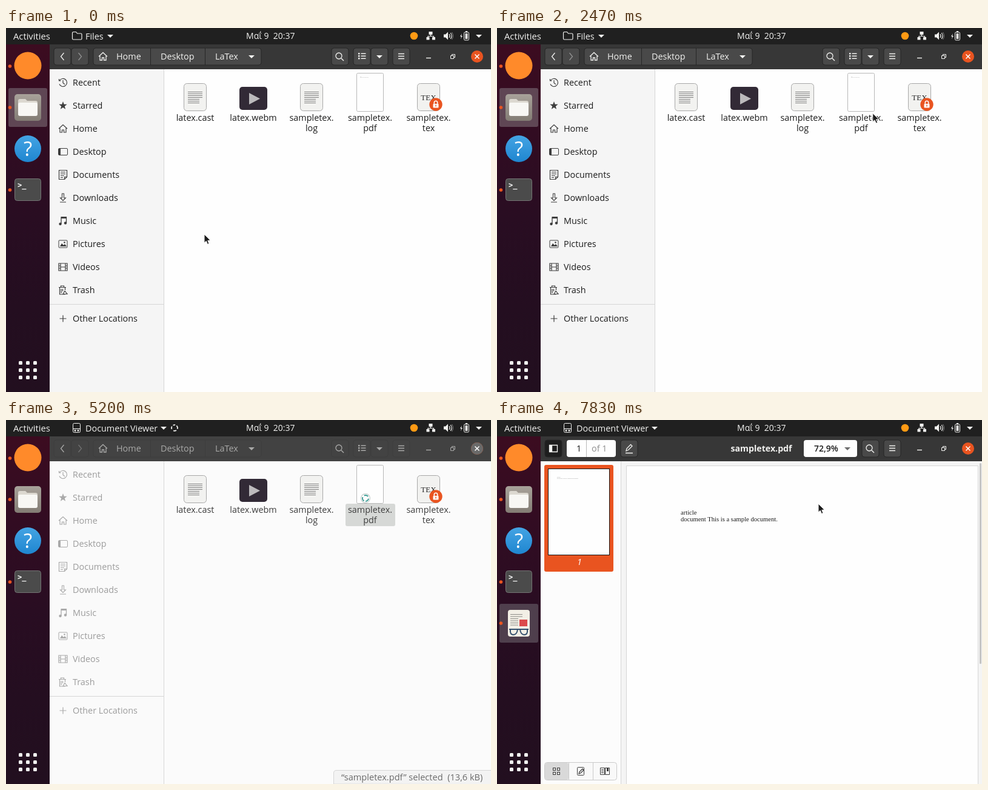
An HTML page that plays this animation: 800x600 px, repeating every 8 s.

```html
<!DOCTYPE html>
<html lang="en">
<head>
<meta charset="utf-8">
<title>Opening a document</title>
<style>
html, body { margin: 0; width: 100%; height: 100%; overflow: hidden; background: #fefefe; }
svg { display: block; width: 800px; height: 600px; font: 14.4px "Open Sans", "Noto Sans", sans-serif; }
text { white-space: pre; }
</style>
</head>
<body>
<svg id="stage" viewBox="0 0 800 600" xmlns="http://www.w3.org/2000/svg"></svg>
<script>
const LOOP = 8000;
const INK = '#1c1c1c', PALE = '#f2f2f0', ORANGE = '#e95420', WHITE = '#fefefe';
const HEAD = '#373737', EDGE = '#262626', SIDE = '#3d3d3d', RULE = '#d6d6d6', PAPER = '#f2f2f0';

// ---- drawing helpers ----
const rect = (x, y, w, h, fill, more = '') =>
  `<rect x="${x}" y="${y}" width="${w}" height="${h}" fill="${fill}" ${more}/>`;
const box = (x, y, w, h, fill, r = 4, stroke = 'none', more = '') =>
  rect(x, y, w, h, fill, `rx="${r}" stroke="${stroke}" ${more}`);
const dot = (x, y, r, fill, more = '') => `<circle cx="${x}" cy="${y}" r="${r}" fill="${fill}" ${more}/>`;
const text = (x, y, s, fill = INK, more = '') => `<text x="${x}" y="${y}" fill="${fill}" ${more}>${s}</text>`;
const mid = 'text-anchor="middle"';
const line = (d, stroke = INK, w = 1) => `<path d="${d}" fill="none" stroke="${stroke}" stroke-width="${w}"/>`;
const shape = (d, fill, more = '') => `<path d="${d}" fill="${fill}" ${more}/>`;
const group = (s, more = '') => `<g ${more}>${s}</g>`;
const at = (x, y, s) => group(s, `transform="translate(${x} ${y})"`);
const caret = (x, y, fill = PALE) => shape(`M${x - 5} ${y - 2.5}h10l-5 5z`, fill);
const times = (n, fn) => Array.from({ length: n }, (_, i) => fn(i)).join('');

// ---- top bar ----
function topBar() {
  const files = line('M109.5 8.5q0-2 2-2h4l2 2.5h6q1.5 0 1.5 1.5v7q0 1.5-1.5 1.5h-12.5q-1.5 0-1.5-1.5z', PALE, 1.2)
    + text(131, 19, 'Files', PALE) + caret(172, 13.5);
  const viewer = box(110.5, 5.5, 12, 15, 'none', 2, PALE) + line('M111 14.5h11', PALE, 1.2)
    + dot(114, 17.5, 1.5, PALE) + dot(119, 17.5, 1.5, PALE)
    + text(131, 19, 'Document Viewer', PALE) + caret(260, 13.5);
  const net = rect(697.5, 6, 6, 5, PALE) + rect(693.5, 15, 5, 4.5, PALE) + rect(703, 15, 5, 4.5, PALE)
    + line('M700.5 11v2.5M696 15v-1.5h9.5v1.5', PALE, 1.2);
  const sound = shape('M722 10.5h3l4-4v13l-4-4h-3z', PALE)
    + line('M731 10q2 3 0 6M733.3 8q3.5 5 0 10', PALE, 1.2) + line('M735.6 7q3.6 6 0 12', '#858585');
  const battery = box(755.5, 7, 8, 13, 'none', 1.5, PALE) + rect(758, 5, 3, 2, PALE)
    + rect(757.5, 9, 4, 9, PALE) + shape('M752 9l-3 5h2l-1 4 3-5h-2z', PALE);
  const arcs = 'M-4.8 -1a5 5 0 0 1 4-4M2 -4.6a5 5 0 0 1 2.8 4M4 3a5 5 0 0 1-4 2M-2.5 4.3a5 5 0 0 1-2.2-3';
  return rect(0, 0, 800, 27, '#202020') + text(12, 19, 'Activities', PALE, 'font-size="14.8"')
    + group(files, 'id="appFiles"') + group(viewer, 'id="appViewer"')
    + group(line(arcs, PALE, 1.7), 'id="spin"')
    + text(396, 18, 'Μαΐ 9\u00a0 20:37', PALE, 'font-size="14"')
    + dot(673, 13, 6.3, '#ff9a14') + net + sound + battery + caret(780, 13.5);
}

// ---- dock ----
const running = y => dot(6.5, y, 2.8, ORANGE);
function dock() {
  const paper = box(18, 313, 36, 44, '#f2efe6', 4)
    + times(6, i => rect(22, 320 + i * 3.5, i > 1 ? 13 : 20, 1, '#8c8c88')) + rect(37, 329, 13, 11, '#dc4a4c')
    + line('M20 345h32M22 345q-1 9 5 9 6 0 7-9zM38 345q1 9 7 9 6 0 5-9z', '#34506e', 2);
  return rect(0, 27, 72, 573, 'url(#dockFill)')
    + box(4, 99, 64, 64, '#5f4654', 3, 'none', 'id="hotFiles"')
    + dot(36, 62, 22.5, '#ff8a2a')
    + box(14, 109, 44, 44, 'url(#filesFill)', 5)
    + shape('M20 120q0-3 3-3h9l3 3h14q3 0 3 3v18q0 3-3 3h-26q-3 0-3-3z', '#dcd8d0')
    + box(20, 123, 32, 22, '#f8f7f4', 3)
    + dot(36, 199, 22, 'url(#helpFill)') + text(36, 211, '?', WHITE, mid + ' font-size="33"')
    + box(14.5, 248.5, 43, 36, '#4b4b4b', 4, '#757575')
    + text(19, 263, '&gt;_', WHITE, 'font-family="DejaVu Sans Mono, monospace" font-size="12" font-weight="bold"')
    + running(63) + running(131) + running(267)
    + group(box(4, 303, 64, 64, '#4f3f4d', 3) + paper + running(335), 'id="hotViewer"')
    + times(9, i => box(21 + i % 3 * 12, 549 + Math.floor(i / 3) * 12, 6, 6, PALE, 1.5));
}

// ---- window chrome ----
const button = (x, w = 28, fill = '#494949') => box(x, 33, w, 28, fill, 4, EDGE);
const search = x => dot(x - 1, 46, 5, 'none', `stroke="${PALE}" stroke-width="1.3"`) + line(`M${x + 3} 50l4 4`, PALE, 1.4);
const menu = x => line(`M${x - 5} 42.5h10m-10 4h10m-10 4h10`, PALE, 1.3);
const winKeys = line('M693 49.5h8', PALE, 1.4) + line('M733.5 45.5h5v5h-5zM735.5 45v-1.5h5v5h-1.5', PALE);
const cross = line('M773.5 43.5l7 7m0-7l-7 7', WHITE, 1.5);
const house = 'M-7 0L0 -6.5L7 0M-5 -1v7h3.5v-4h3v4h3.5v-7';

function filesHeader() {
  const plates = button(79) + button(108) + button(144, 277) + button(537) + button(573) + button(602) + button(638)
    + line('M238.5 33v28M328.5 33v28', EDGE);
  const marks = line('M95.5 41l-5 6 5 6', PALE, 1.3) + line('M119.5 41l5 6-5 6', '#929292', 1.3)
    + at(160, 47, line(house, PALE, 1.3)) + text(182, 52, 'Home', PALE) + text(255, 52, 'Desktop', PALE)
    + text(345, 52, 'LaTex', PALE) + caret(405, 47.5) + search(550) + caret(616, 47.5) + menu(652)
    + times(3, i => rect(581, 41 + i * 4, 2.5, 2.5, PALE) + rect(585.5, 41.5 + i * 4, 8, 1.5, PALE)) + winKeys;
  return rect(72, 27, 728, 41, HEAD) + rect(72, 27, 728, 41, '#424242', 'id="headDim"')
    + group(plates, 'id="plates"') + group(marks, 'id="marks"')
    + dot(777, 47, 10, ORANGE) + dot(777, 47, 10, '#6a6a6a', 'id="closeDim"') + cross;
}

// ---- sidebar ----
const star = times(10, i => {
  const r = i % 2 ? 2.9 : 7, a = i * Math.PI / 5;
  return `${i ? 'L' : 'M'}${(r * Math.sin(a)).toFixed(2)} ${(-r * Math.cos(a)).toFixed(2)}`;
}) + 'z';
const places = [
  ['Recent', line('M-5.5 -3.5a6.5 6.5 0 1 1 -.5 6M0 -4v4.5l3 2.5M-6.5 -6v3h3', SIDE, 1.2)],
  ['Starred', shape(star, SIDE)],
  ['Home', line(house, SIDE, 1.2)],
  ['Desktop', box(-7.5, -5.5, 15, 11, 'none', 1.5, SIDE) + rect(-7, -5, 3, 10, SIDE)],
  ['Documents', line('M-6.5 -7.5h13v11l-4 4h-9zM6.5 3.5h-4v4M-4 -4.5h8m-8 3h8m-8 3h6m-6 3h4', SIDE, 1.2)],
  ['Downloads', line('M-1.5 -7h3v7h3l-4.5 4.5l-4.5 -4.5h3zM-5 7h10', SIDE, 1.1)],
  ['Music', line('M-3 5v-11h8.5v9', SIDE, 1.3) + rect(-3, -7, 9, 3, SIDE) + dot(-4.5, 5, 2.2, SIDE) + dot(4, 3.5, 2.2, SIDE)],
  ['Pictures', box(-7, -6, 14, 12, 'none', 1, SIDE) + shape('M-5 4l3-5 3 3 2-2 3 4z', SIDE) + dot(2.5, -2.5, 1.3, SIDE)],
  ['Videos', line('M-7 -6h14v12h-14zM-4 -6v12M4 -6v12M-7 -2h3m-3 4h3M4 -2h3m-3 4h3M-4 0h8', SIDE, 1.2)],
  ['Trash', line('M-7 -4.5h12M-3.5 -4.5v-2.5h5v2.5M-5.5 -4.5v11.5h9M-3 -2v7m2.5-7v4M3.5 -4v4M0 6.5l3-5 4 5z', SIDE, 1.2)],
];
const place = (y, [name, icon]) => at(94, y, icon) + text(110, y + 5, name);
function sidebar() {
  const rows = places.map((p, i) => place(90 + i * 38, p)).join('')
    + place(479, ['Other Locations', line('M-5.5 0h11M0 -5.5v11', SIDE, 1.2)]);
  return rect(72, 68, 188, 532, '#f5f5f5') + rect(72, 68, 188, 532, '#fafafa', 'id="sideDim"')
    + line('M72 455.5h188M260.5 68v532', RULE) + group(rows, 'id="places"');
}

// ---- file grid ----
const sheet = (x, id, inside) => box(x + .5, 91.5, 37, 45, PAPER, 5, '#a8a8a8', `id="${id}"`) + inside;
const ruled = x => times(7, i => rect(x + 7, 105 + i * 3, i > 3 ? 19 : 24, 1, '#7c7c7c'));
const label = (x, a, b = '') => text(x, 153, a, 'currentColor', mid) + text(x, 170, b, 'currentColor', mid);
const tiny = (x, y, size) => text(x, y, 'article', '#858585', `font-size="${size}"`)
  + text(x, y + size * 1.15, 'document This is a sample document.', '#858585', `font-size="${size}"`);
function grid() {
  const lock = dot(709, 126, 10.7, ORANGE) + box(704.5, 125, 9, 6.5, WHITE, 1)
    + line('M706.3 125v-2a2.7 2.7 0 0 1 5.4 0v2', WHITE, 1.6) + rect(708.3, 126.5, 1.4, 3, ORANGE);
  return rect(261, 68, 539, 532, WHITE) + rect(261, 68, 539, 532, '#fbfbfb', 'id="gridDim"')
    + sheet(293, 'cast', ruled(293)) + sheet(485, 'log', ruled(485))
    + box(385, 97, 46, 38, '#322a36', 5) + shape('M401 107v19l18-9.5z', '#bcbabc')
    + box(578.5, 74.5, 44, 63, WHITE, 2, '#b8b8b8') + group(tiny(584, 81, .8), 'id="pdfText"')
    + sheet(678, 'tex', text(697, 119, 'TEX', '#2a2a2a', mid + ' font-family="Liberation Serif, serif" font-size="13"')) + lock
    + box(560, 138, 82, 37, ORANGE, 3, 'none', 'id="pick"')
    + group(label(312, 'latex.cast') + label(408, 'latex.webm') + label(504, 'sampletex.', 'log')
      + label(697, 'sampletex.', 'tex'), 'id="names"')
    + group(label(600.5, 'sampletex.', 'pdf'), 'id="pdfName"')
    + group(shape('M540.5 600v-18q0-4.5 4.5-4.5h256v23z', '#f3f3f3', `stroke="${RULE}"`)
      + text(553, 594, '“sampletex.pdf” selected\u00a0 (13,6 kB)', SIDE, 'id="statusText" font-size="14.6"'), 'id="status"');
}

// ---- document viewer ----
function viewer() {
  const head = rect(72, 27, 728, 41, HEAD) + button(79, 28, '#1e1e1e')
    + line('M86.5 41.5h13v11h-13zM90.5 41.5v11', PALE, 1.3) + rect(87, 42, 4, 10, PALE)
    + box(115, 33, 81, 28, WHITE) + line('M147.5 33v28', '#b8b8b8')
    + text(131, 52, '1') + text(156, 52, 'of 1', '#8f8f8f')
    + button(204) + line('M213 51l1-4 6.5-6.5 2.5 2.5-6.5 6.5zM212 54.5h12', PALE, 1.3)
    + text(436, 52, 'sampletex.pdf', PALE, mid + ' font-weight="700" font-size="14.2"')
    + box(506, 33, 88, 28, WHITE) + text(523, 52, '72,9%', INK, 'font-weight="600" font-size="14"') + caret(578, 47.5, '#6d6d6d')
    + button(602) + search(615) + button(638) + menu(652) + winKeys + dot(777, 47, 10, ORANGE) + cross;
  const thumb = box(78, 74, 114, 176, ORANGE, 3) + rect(84.5, 80.5, 101, 142, WHITE, 'stroke="#151515"')
    + tiny(99, 95, 2) + text(136, 239, '1', WHITE, mid + ' font-style="italic"');
  const tabs = box(78.5, 564.5, 119, 29, '#f9f9f9', 4, '#cacaca') + box(79, 565, 39, 28, '#d9d9d9', 3)
    + line('M118.5 565v28M158.5 565v28', '#cacaca')
    + times(4, i => rect(92.5 + i % 2 * 7, 573.5 + (i >> 1) * 7, 4, 4, 'none', `stroke="${SIDE}"`))
    + box(132.5, 572.5, 11, 13, 'none', 1, SIDE) + line('M135 583l1-3 5-5 2 2-5 5z', SIDE, 1.3)
    + line('M170.5 573.5h7v11h-7zM178.5 573.5h7v11h-7zM172 576.5h4m-4 2.5h4m-4 2.5h4', SIDE) + rect(181, 573, 3, 6, SIDE);
  const serif = 'font-family="Liberation Serif, serif" font-size="10.6"';
  const page = rect(204, 68, 596, 532, '#f4f4f4') + rect(214, 76, 579, 524, WHITE)
    + line('M204.5 68v532M213.5 600v-524.5h580v524.5', RULE)
    + text(303, 156, 'article', INK, serif) + text(303, 167, 'document This is a sample document.', INK, serif);
  return head + rect(72, 68, 132, 532, '#fcfcfc') + thumb + tabs + page + box(796, 71, 3, 331, '#c4c4c4', 1.5);
}

const fade = (id, ...stops) => `<linearGradient id="${id}" x2="0" y2="1">`
  + stops.map((c, i) => `<stop offset="${i / (stops.length - 1)}" stop-color="${c}"/>`).join('') + '</linearGradient>';

document.getElementById('stage').innerHTML =
  '<defs>' + fade('dockFill', '#3c0c20', '#320c22', '#290d22', '#240e20', '#220f1f')
  + fade('filesFill', '#a8a29a', '#837c74') + fade('helpFill', '#44a4e4', '#1f86d0') + '</defs>'
  + filesHeader() + grid() + sidebar() + group(viewer(), 'id="viewer"') + dock() + topBar()
  + group(shape('M0 0V14.2L3.3 11.3L5.5 16.5L8 15.4L5.8 10.4L10.2 10Z', INK, `stroke="${WHITE}"`), 'id="arrow"')
  + group(dot(0, 0, 7.5, WHITE, 'stroke="#c0c8c6"')
    + dot(0, 0, 5, 'none', 'stroke="#3f9d95" stroke-width="2" stroke-dasharray="7 3.47"'), 'id="busy"');

const el = {};
document.querySelectorAll('[id]').forEach(n => el[n.id] = n);
const show = (n, o) => n.setAttribute('opacity', +o);
const fill = (n, c) => n.setAttribute('fill', c);

// ---- timing: the screen refreshes only at these moments ----
const beats = [0, 700, 870, 1040, 1200, 1300, 1430, 1570, 1700, 1870, 2030, 2160, 2290, 2420, 2550, 2670,
  3300, 3500, 3730, 3970, 4200, 4430, 4700, 4970, 5200, 5400, 5630, 6230, 6530, 6730, 6880, 7030, 7700, 7830];
const path = [[600, 327, 340], [1200, 556, 136], [1700, 676, 166], [1870, 683, 170],
  [2670, 591, 127], [7600, 591, 127], [7830, 530, 138]];
const span = (t, a, b) => Math.min(1, Math.max(0, (t - a) / (b - a)));

function pointer(t) {
  let i = 0;
  while (i < path.length - 2 && t > path[i + 1][0]) i++;
  const [ta, xa, ya] = path[i], [tb, xb, yb] = path[i + 1], k = span(t, ta, tb);
  return [xa + (xb - xa) * k, ya + (yb - ya) * k];
}

function draw(now) {
  const t = beats.findLast(b => b <= now);
  const launched = t >= 3300, busy = launched && t < 6530;
  const dim = span(t, 3500, 3970), open = span(t, 6530, 6880);
  const [x, y] = pointer(t), turn = t * .3 % 360;

  el.arrow.setAttribute('transform', `translate(${x} ${y})`);
  el.busy.setAttribute('transform', `translate(593 129) rotate(${turn})`);
  el.spin.setAttribute('transform', `translate(278 13) rotate(${turn})`);
  show(el.arrow, !busy);
  show(el.busy, busy);
  show(el.spin, launched && open < 1);
  show(el.appFiles, !launched);
  show(el.appViewer, launched);
  show(el.hotFiles, !launched);
  show(el.hotViewer, open > 0);

  for (const id of ['headDim', 'sideDim', 'gridDim', 'closeDim']) show(el[id], dim);
  show(el.plates, 1 - .85 * dim);
  show(el.marks, 1 - .42 * dim);
  show(el.places, 1 - .58 * dim);
  show(el.statusText, 1 - .25 * dim);
  show(el.status, launched);
  show(el.pick, launched);
  show(el.pdfText, !busy);
  fill(el.pick, dim > .5 ? '#d6d8d6' : ORANGE);
  el.names.setAttribute('color', dim > .5 ? SIDE : INK);
  el.pdfName.setAttribute('color', dim > .5 ? SIDE : launched ? WHITE : INK);

  const hover = t < 1040 ? '' : t < 1300 ? 'log' : t < 1570 ? 'pdf' : t < 2290 ? 'tex' : 'pdf';
  for (const id of ['log', 'tex']) fill(el[id], hover === id ? '#fcfcfc' : PAPER);

  const s = .9 + .1 * open;
  show(el.viewer, open);
  el.viewer.setAttribute('transform', `translate(${436 * (1 - s)} ${313 * (1 - s)}) scale(${s})`);
}

function tick() {
  draw(performance.now() % LOOP);
  requestAnimationFrame(tick);
}
tick();
</script>
</body>
</html>
```
